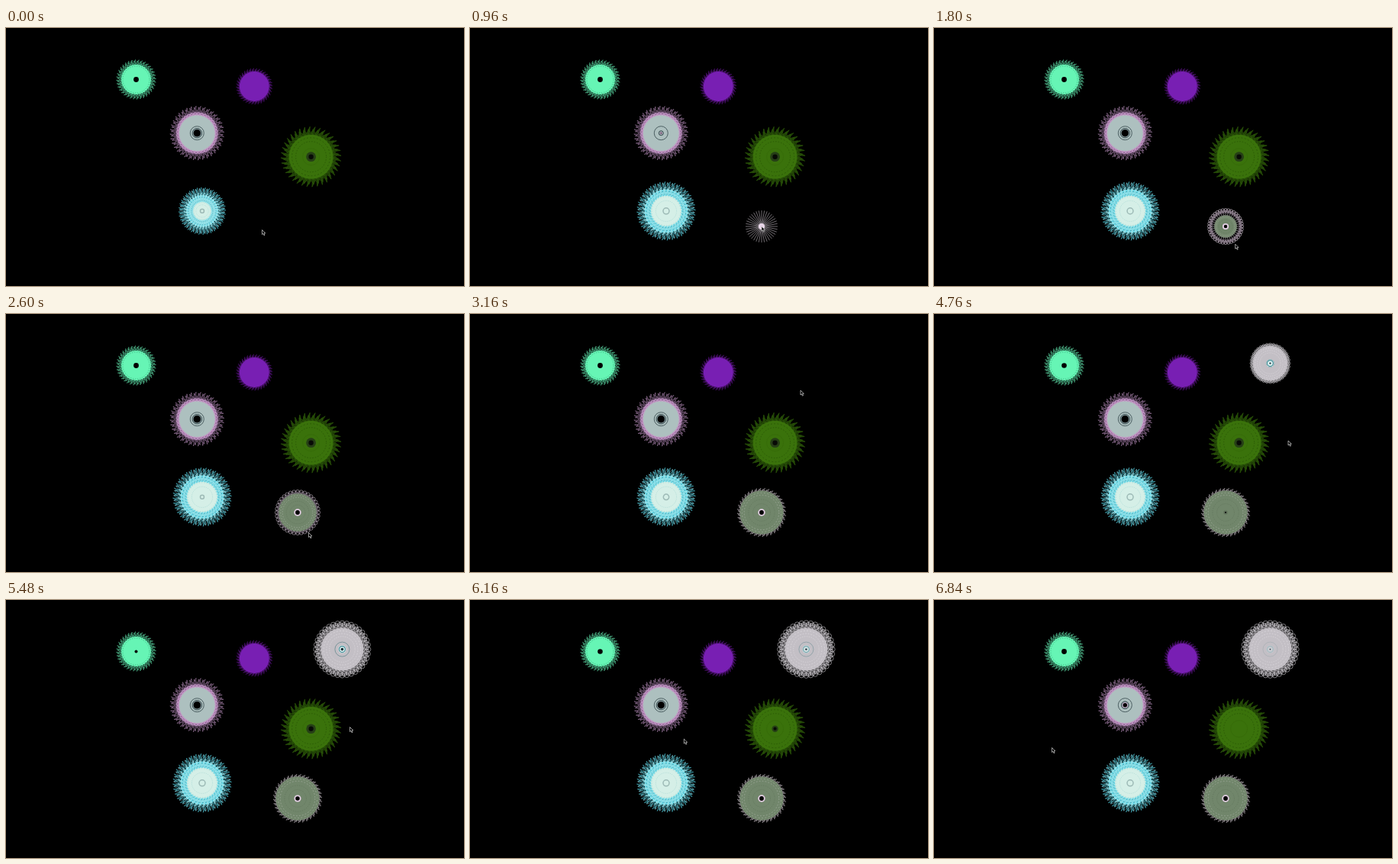
An HTML page with a canvas that plays this animation: 600 by 338 pixels, repeating every 6880 ms.

```html
<!DOCTYPE html>
<html lang="en">
<head>
<meta charset="utf-8">
<title>Rosettes</title>
<style>
html, body { margin: 0; width: 100%; height: 100%; overflow: hidden; background: #000; }
canvas { display: block; width: 600px; height: 338px; }
</style>
</head>
<body>
<canvas id="stage" width="600" height="338"></canvas>
<script>
const ctx = document.getElementById('stage').getContext('2d');
const LOOP = 6880, TICK = 40, PETALS = 36, TAU = Math.PI * 2, STEP = TAU / PETALS;

const clamp = v => Math.min(1, Math.max(0, v));
const mix = (a, b, k) => a + (b - a) * k;
const smooth = k => k * k * (3 - 2 * k);
const ramp = (t, start, end, from = 0, to = 1) => mix(from, to, clamp((t - start) / (end - start)));
// Soft bump of height 1 around a moment
const bump = (t, peak, width = 450) => Math.exp(-(((t - peak) / width) ** 2));
const polar = (r, a) => [r * Math.cos(a), r * Math.sin(a)];

function stroke(color, width) {
  ctx.strokeStyle = color;
  ctx.lineWidth = width;
  ctx.stroke();
}
function faded(alpha, draw) {
  ctx.globalAlpha = alpha;
  draw();
  ctx.globalAlpha = 1;
}
function circle(r) {
  ctx.beginPath();
  ctx.arc(0, 0, Math.max(0, r), 0, TAU);
}
function disc(r, color) {
  circle(r);
  ctx.fillStyle = color;
  ctx.fill();
}
function ring(r, color, width = 0.7) {
  circle(r);
  stroke(color, width);
}
function dots(r, color, width = 0.9, shift = 0) {
  const gap = r * STEP;
  ctx.setLineDash([gap * 0.45, gap * 0.55]);
  ctx.lineDashOffset = shift * gap;
  ring(r, color, width);
  ctx.setLineDash([]);
}
// Evenly spaced dotted rings, each turned half a petal from the last
function stipple(r0, r1, count, color, width) {
  for (let i = 0; i < count; i++) dots(mix(r0, r1, i / (count - 1)), color, width, i / 2);
}
// Pointed strands between two radii; lean is in petal steps
function teeth(r0, r1, color, lean = 0.8, width = 0.7, fill) {
  ctx.beginPath();
  for (let i = 0; i < PETALS; i++) {
    const a = i * STEP;
    ctx.moveTo(...polar(r0, a - 0.6 * STEP));
    ctx.lineTo(...polar(r1, a + lean * STEP));
    ctx.lineTo(...polar(r0, a + 0.6 * STEP));
  }
  if (fill) {
    ctx.fillStyle = fill;
    ctx.fill();
  }
  stroke(color, width);
}
function weave(r0, r1, color, width) {
  teeth(r0, r1, color, 0.8, width);
  teeth(r0, r1 - 1.5, color, -0.7, width);
}
function loops(r, size, color, shift = 0) {
  ctx.beginPath();
  for (let i = 0; i < PETALS; i++) {
    const [x, y] = polar(r, (i + shift) * STEP);
    ctx.moveTo(x + size, y);
    ctx.arc(x, y, size, 0, TAU);
  }
  stroke(color, 0.6);
}
function rays(r, color) {
  ctx.beginPath();
  for (let i = 0; i < PETALS; i++) {
    ctx.moveTo(0, 0);
    ctx.lineTo(...polar(r, i * STEP));
  }
  stroke(color, 0.6);
}

function mint(t) {
  weave(19, 26, '#4fb98c', 0.65);
  disc(19.5, '#66f5b5');
  stipple(17.5, 20.5, 2, '#3fb785');
  disc(3.4 - 1.4 * bump(t, 5480), '#000');
}

function purple() {
  weave(18, 23.8, '#481069', 0.7);
  disc(19.5, '#781fb3');
  dots(20.2, '#5c1788', 1.2);
}

function pink(t) {
  weave(26, 35.5, '#a27ca4', 0.6);
  disc(27.5, '#bd90c0');
  stipple(25.5, 28.5, 3, '#74567a');
  disc(23.5, '#adc0bf');
  dots(23.5, '#c3b2c8');
  const hole = 4.1 - 3.3 * bump(t, 960) - 1.4 * bump(t, LOOP);
  ring(9, '#4b5e61', 1);
  disc(hole + 2.2, '#899c9e');
  ring(hole + 2.2, '#33464a', 0.9);
  disc(hole + 0.8, hole < 3 ? '#d0abd0' : '#182023');
  disc(hole, '#000');
}

function green(t) {
  teeth(28, 39.5, '#2d5909', 0.8, 0.7, '#1c3a05');
  teeth(28, 36, '#2d5909', -0.6);
  disc(29, '#3a720b');
  stipple(20, 30, 3, '#2b5807');
  ring(11, '#35690a');
  const open = 1 - bump(t, LOOP, 700);
  disc(6.4 * open, '#263f16');
  disc(3.2 * open, '#080b06');
}

function cyan(t) {
  const out = ramp(t, 0, 640, 31, 38.5);
  const core = ramp(t, 0, 900, 12, 20);
  const body = out - 9;
  weave(body - 2, out, '#48b9c8', 0.65);
  teeth(body, out - 1, '#87bfc6', 0.3, 0.5);
  disc(body - 1, '#5fd2e1');
  weave(core, body + 2, '#a6e7eb', 0.7);
  stipple(core + 2, body, 3, '#2e98a8', 0.7);
  disc(core, '#d5efe7');
  stipple(core * 0.68, core - 1, 2, '#a9d8d4', 0.8);
  ring(4 - 1.5 * bump(t, 0) - 1.5 * bump(t, 2600), '#9dbab6', 1.5);
}

function sage(t) {
  if (t < 760) return;
  const out = ramp(t, 1450, 2900, 21, 32);
  const body = ramp(t, 760, 2900, 1.5, 28.5);
  const settled = ramp(t, 2500, 3100);
  if (body < 21) rays(21, '#bcb4bd');
  if (out > 21) {
    faded(1 - settled, () => {
      loops(out - 2.5, 2.4, '#d9cbd9');
      loops(out - 4, 2, '#a992aa', 0.5);
    });
    faded(settled, () => weave(body - 2, out, '#a29ba1', 0.65));
  }
  disc(body, body < 7 ? '#ead8ea' : '#71866b');
  if (body > 12) {
    stipple(body * 0.8, body, 3, '#a5aea1', 0.7);
    stipple(body * 0.4, body * 0.6, 2, '#5f735a', 0.7);
  }
  const closed = bump(t, 4760);
  const hole = 2.9 * ramp(t, 1100, 2000) - 1.9 * closed;
  disc(hole + 1.8, closed + bump(t, 3720) > 0.5 ? '#60725b' : '#e4cfe4');
  disc(hole, '#000');
}

function pearl(t) {
  if (t < 3360) return;
  const out = ramp(t, 4400, 5500, 21, 37.8);
  const body = ramp(t, 3360, 5100, 1.5, 28);
  const edge = Math.min(body, out - 3);
  if (body < 21) rays(21, '#b7bbc1');
  if (out > 21) {
    const lace = (out - edge) / 3;
    faded(0.5, () => disc(out - lace, '#aaa5ac'));
    loops(out - lace, lace, '#c9c6cb');
    loops(out - lace * 1.7, lace, '#dedbe0', 0.5);
  }
  disc(edge, body < 9 ? '#cfe5f2' : '#c3bfc5');
  if (body > 12) stipple(edge * 0.6, edge, 4, '#dcd8dd', 0.8);
  if (t > 4200) {
    const tint = ramp(t, 4200, 4760) * ramp(t, 5600, LOOP, 1, 0.25);
    faded(tint, () => {
      ring(ramp(t, 4760, 5480, 5, 9.5), '#7b969b', 1);
      disc(5, '#d9eeee');
      ring(4, '#4d939d', 1.2);
    });
    disc(0.8 + bump(t, 5480, 700), '#172a32');
  }
}

// Resting places of the pointer: arrival, departure, position
const STOPS = [
  [0, 0, 335.5, 264.5], [620, 1450, 382, 260], [1900, 2600, 396.5, 286.5],
  [3350, 4250, 440, 64.5], [4600, 4950, 464, 166], [5400, 5500, 450.5, 166.5],
  [6700, LOOP, 154.5, 193.5]
];
function pointer(t) {
  const next = Math.max(1, STOPS.findIndex(stop => t < stop[1]));
  const [, leave, x0, y0] = STOPS[next - 1], [arrive, , x1, y1] = STOPS[next];
  const k = smooth(ramp(t, leave, arrive));
  at(mix(x0, x1, k), mix(y0, y1, k), () => {
    ctx.fillStyle = '#000';
    const arrow = new Path2D('M0 0V6L1.4 4.8L2.5 7.2L3.5 6.7L2.5 4.4L4.3 4.3Z');
    ctx.fill(arrow);
    ctx.strokeStyle = '#d8d8d8';
    ctx.lineWidth = 0.7;
    ctx.stroke(arrow);
  });
}

function at(x, y, draw) {
  ctx.save();
  ctx.translate(x, y);
  draw();
  ctx.restore();
}

const ROSETTES = [
  [170.5, 67.5, mint], [325.3, 76.5, purple], [250.3, 137.7, pink], [399.6, 168.7, green],
  [257, 239.8, cyan], [382, 260, sage], [440.4, 64.6, pearl]
];

function render(t) {
  ctx.fillStyle = '#000';
  ctx.fillRect(0, 0, 600, 338);
  for (const [x, y, draw] of ROSETTES) at(x, y, () => draw(t));
  pointer(t);
}

const start = performance.now();
function frame() {
  const t = (performance.now() - start) % LOOP;
  render(Math.floor(t / TICK) * TICK);
  requestAnimationFrame(frame);
}
frame();
</script>
</body>
</html>
```
